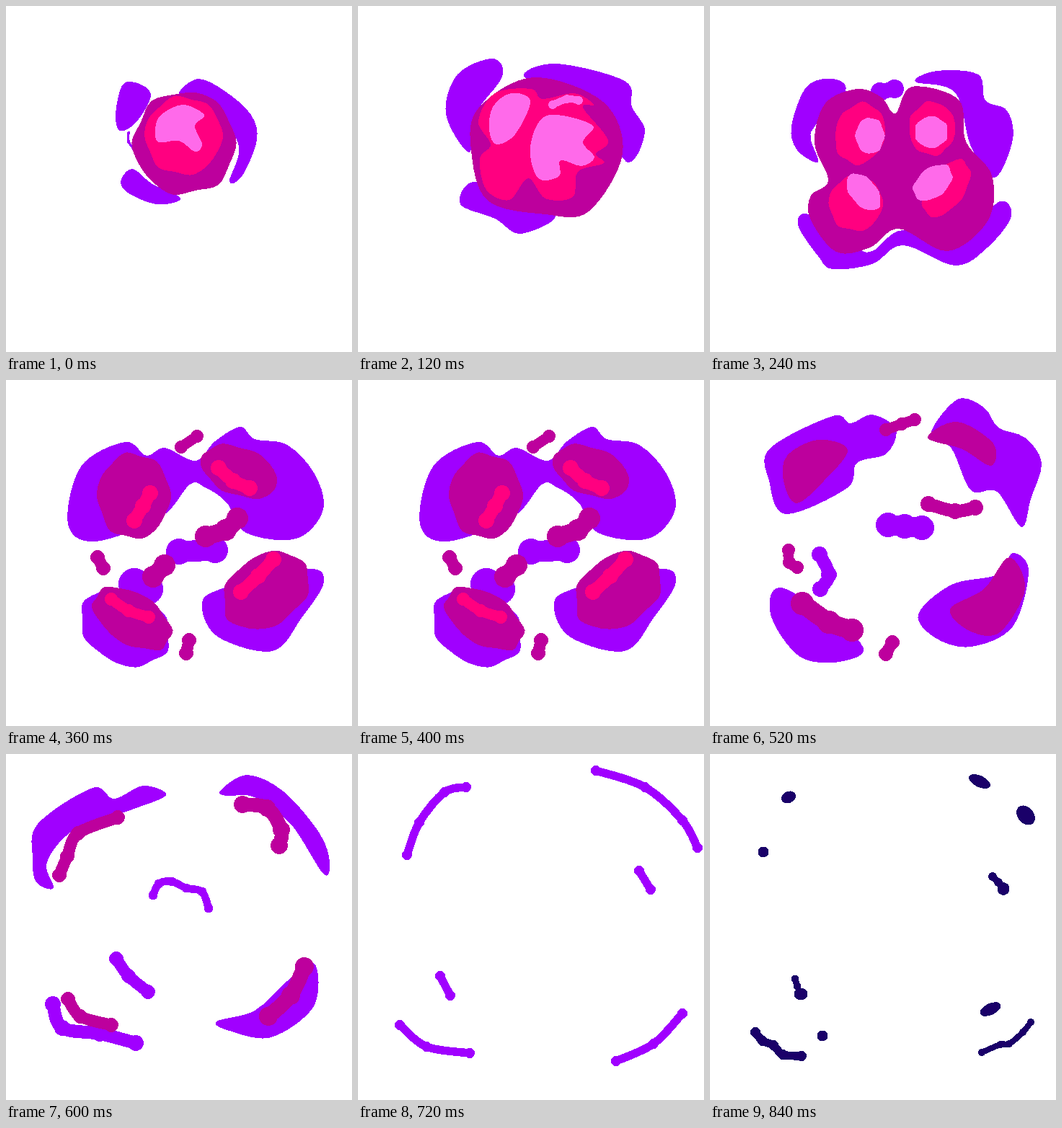
Write an HTML page that moves like this. It is 480 by 480 pixels and loops after 0.96 s.

```html
<!DOCTYPE html>
<html lang="en">
<head>
<meta charset="utf-8">
<title>Puff</title>
<style>
html, body { margin: 0; width: 100%; height: 100%; overflow: hidden; background: #fff; }
svg { display: block; width: 100%; height: 100%; shape-rendering: crispEdges; }
.pose { visibility: hidden; animation: show 960ms step-end infinite; }
.purple { color: #a000ff; }
.plum { color: #bd009d; }
.pink { color: #ff0080; }
.light { color: #ff6aea; }
.navy { color: #1a0069; }
.cool { animation: cool 960ms step-end infinite; }
path, circle, ellipse { fill: currentColor; }
.line { fill: none; stroke: currentColor; stroke-linecap: round; stroke-linejoin: round; }
@keyframes show { 0% { visibility: visible; } 12.5%, 100% { visibility: hidden; } }
@keyframes cool { 0% { color: #a000ff; } 79.1667%, 100% { color: #1a0069; } }
</style>
</head>
<body>
<svg id="stage" viewBox="0 0 480 480"></svg>
<script>
const NS = 'http://www.w3.org/2000/svg';
const LOOP = 960, HOLD = 120;
const stage = document.getElementById('stage');
let pose, layer, poses = 0;

function add(parent, tag, attrs) {
  const el = document.createElementNS(NS, tag);
  for (const k in attrs) el.setAttribute(k, attrs[k]);
  return parent.appendChild(el);
}

function nextPose() {
  pose = add(stage, 'g', { class: 'pose', style: `animation-delay:${poses++ * HOLD - LOOP}ms` });
}

function paint(color) {
  layer = add(pose, 'g', { class: color });
}

const parse = text => text.split(' ').map(s => s.split(',').map(Number));

// Catmull-Rom curve through the points.
function smooth(p, closed) {
  const n = p.length;
  const at = i => closed ? p[(i + n) % n] : p[Math.max(0, Math.min(n - 1, i))];
  let d = 'M' + p[0];
  for (let i = 0; i < (closed ? n : n - 1); i++) {
    const z = at(i - 1), a = at(i), b = at(i + 1), c = at(i + 2);
    const h1 = a.map((v, k) => v + (b[k] - z[k]) / 6);
    const h2 = b.map((v, k) => v - (c[k] - a[k]) / 6);
    d += `C${h1} ${h2} ${b}`;
  }
  return d;
}

function blob(text) {
  add(layer, 'path', { d: smooth(parse(text), true) + 'Z' });
}

// Round-ended strand that swells at its points.
function worm(width, text) {
  const p = parse(text);
  add(layer, 'path', { class: 'line', 'stroke-width': width * 0.82, d: smooth(p) });
  p.forEach(([cx, cy]) => add(layer, 'circle', { cx, cy, r: width / 2 }));
}

// Ellipse with an uneven rim.
function oval(x, y, rx, ry, turn = 0) {
  const t = turn * Math.PI / 180, n = 14, pts = [];
  for (let i = 0; i < n; i++) {
    const a = i / n * 2 * Math.PI;
    const k = 1 + 0.05 * Math.sin(i * 2.6 + x);
    const u = rx * k * Math.cos(a), v = ry * k * Math.sin(a);
    pts.push([x + u * Math.cos(t) - v * Math.sin(t), y + u * Math.sin(t) + v * Math.cos(t)]);
  }
  add(layer, 'path', { d: smooth(pts, true) + 'Z' });
}

function dot(cx, cy, rx, ry = rx, turn = 0) {
  add(layer, 'ellipse', { cx, cy, rx, ry, transform: `rotate(${turn} ${cx} ${cy})` });
}

nextPose();
paint('purple');
blob('240,121 267,101 305,119 340,151 348,186 328,235 310,243 322,190 270,125');
blob('162,109 185,108 201,125 180,162 158,173 152,150');
worm(4, '170,176 170,188 177,198');
blob('160,240 176,226 203,247 242,266 222,275 196,272 165,256');
paint('plum');
oval(248, 190, 71, 71);
paint('pink');
oval(246, 180, 53, 54);
paint('light');
blob('207,173 214,152 245,137 275,151 262,166 272,192 262,202 240,187 212,189');

nextPose();
paint('purple');
blob('138,95 187,73 200,98 163,150 154,203 122,150');
blob('231,99 275,80 370,104 380,140 398,175 372,216 320,130');
blob('142,275 160,244 220,270 274,292 225,316 190,295');
paint('plum');
blob('157,200 167,142 243,99 340,133 367,205 320,285 260,289 180,270');
paint('pink');
blob('167,160 190,121 240,115 256,129 300,121 327,137 312,141 347,186 330,205 341,218 305,230 298,265 260,267 236,239 210,269 178,255 169,212 184,192');
paint('light');
blob('187,140 212,121 239,132 218,178 192,192 182,172');
worm(12, '270,137 290,129 306,131');
blob('239,195 262,152 325,165 312,189 328,210 310,222 281,214 279,236 250,239');

nextPose();
paint('purple');
blob('134,112 170,101 188,118 146,166 140,185 150,217 121,200 113,167');
worm(26, '236,119 256,115');
blob('285,105 315,90 372,95 382,131 412,145 420,185 395,238 362,195 340,120');
blob('122,304 137,289 200,333 225,340 267,311 340,330 400,272 418,292 385,335 340,360 268,332 225,358 170,365 150,347');
paint('plum');
blob('145,190 160,135 205,115 238,127 257,149 280,112 345,130 355,188 391,235 386,297 330,340 262,309 222,335 175,341 139,295 140,263 164,242');
paint('pink');
oval(208, 177, 34, 43, 15);
oval(308, 170, 32, 37);
oval(202, 274, 37, 38);
oval(328, 253, 25, 45, 35);
paint('light');
oval(222, 180, 20, 25);
oval(307, 175, 23, 22);
oval(213, 258, 18, 30, -40);
oval(309, 245, 20, 31, 50);

nextPose();
paint('purple');
blob('104,120 165,86 195,105 220,94 263,112 290,85 325,65 345,82 390,90 428,130 440,180 403,220 333,212 306,170 276,149 255,145 215,190 125,224 86,200');
worm(36, '240,238 290,236');
oval(165, 343, 65, 50, 30);
worm(44, '178,283 196,290');
blob('272,315 295,291 415,262 441,280 410,330 370,376 295,357');
paint('plum');
oval(177, 161, 50, 59);
worm(18, '243,93 265,78');
oval(324, 127, 56, 33, 22);
worm(30, '277,217 305,208 321,192');
worm(20, '127,246 135,261');
worm(30, '204,273 220,257');
oval(175, 331, 60, 35, 32);
worm(20, '254,361 250,379');
oval(361, 292, 65, 48, -35);
paint('pink');
worm(22, '178,195 190,175 200,157');
worm(22, '295,122 315,140 338,150');
worm(18, '146,304 170,320 198,329');
worm(22, '326,294 350,272 371,249');

nextPose();
paint('purple');
blob('83,95 170,50 195,60 225,48 258,68 245,102 204,115 190,150 105,186 82,140');
blob('306,75 343,27 380,38 400,66 437,80 460,115 445,165 432,204 398,155 362,153 335,95');
worm(34, '247,201 270,203 294,205');
worm(22, '152,242 165,270 153,290');
blob('84,325 103,289 209,365 185,390 125,384');
blob('289,325 335,284 398,270 420,240 442,265 420,342 362,370 313,358');
paint('plum');
blob('107,105 150,83 191,97 158,140 120,171 102,140');
worm(18, '244,69 266,61 284,55');
blob('302,80 343,58 393,88 390,119 350,96');
worm(22, '303,172 340,182 368,177');
worm(18, '109,236 110,253 121,260');
worm(32, '128,310 165,336 197,347');
worm(20, '253,364 244,380');
blob('333,318 380,290 415,246 437,290 402,350 360,348');

nextPose();
paint('purple');
blob('44,97 120,47 150,62 190,44 222,57 175,77 95,105 57,150 66,186 42,178 37,145');
blob('298,50 335,29 385,52 435,110 449,150 440,166 395,97 345,60 305,58');
worm(13, '204,196 212,180 230,177 250,186 272,191 281,214');
worm(20, '153,284 170,308 197,330');
worm(22, '65,347 78,380 130,388 180,401');
blob('292,371 345,356 390,315 428,291 427,350 368,393 310,384');
paint('plum');
worm(20, '74,168 85,142 100,110 155,88');
worm(24, '328,70 362,75 382,105 379,127');
worm(20, '86,340 103,364 146,376');
worm(26, '364,364 395,335 414,295');

nextPose();
paint('cool');
worm(14, '68,140 85,95 120,53 150,46');
worm(14, '330,23 398,46 450,92 471,130');
worm(14, '390,162 406,188');
worm(14, '114,308 128,335');
worm(14, '58,376 95,406 155,415');
worm(14, '358,426 410,402 450,360');

nextPose();
paint('navy');
dot(109, 60, 10.5, 8, -25);
dot(74, 136, 7.5);
dot(374, 38, 16, 8, 25);
dot(438, 85, 15, 11, 50);
dot(389, 354, 15.5, 8, -25);
dot(156, 391, 7.5);
worm(12, '392,170 400,178');
dot(407, 187, 8.5, 9);
worm(11, '118,312 121,322');
dot(126, 333, 9.5, 8.5);
worm(14, '63,386 73,398 88,404 101,417 127,419');
worm(10, '377,414 403,403 415,402 434,386 445,372');
</script>
</body>
</html>
```
